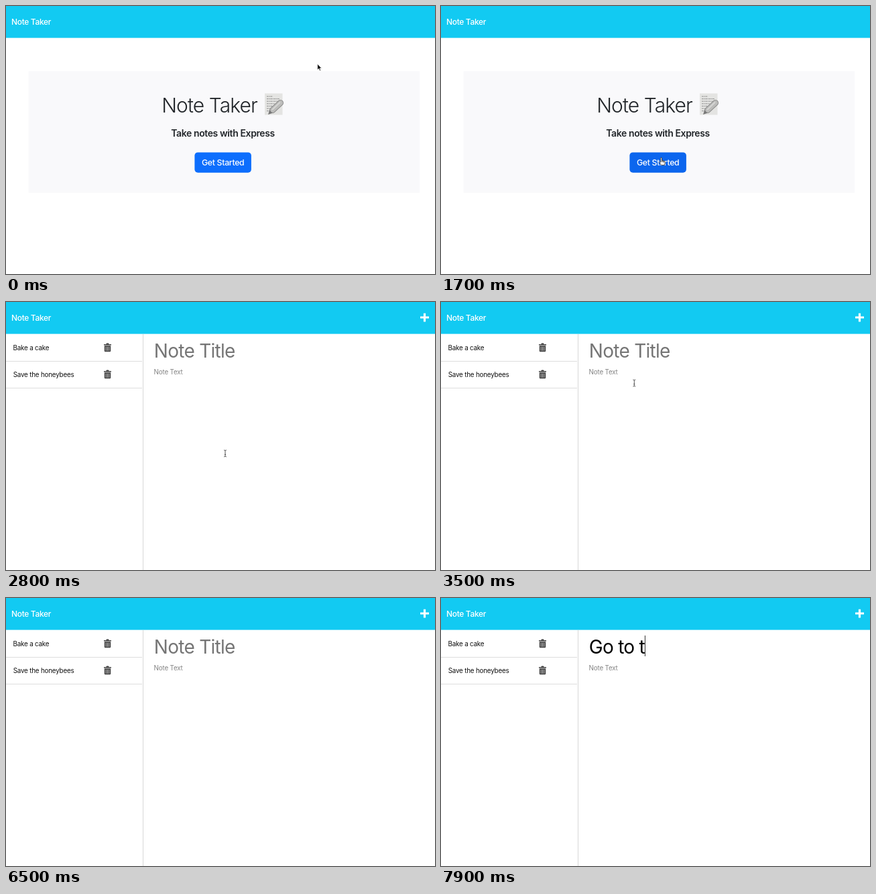
Animation of 640x400 px, one loop 8 s. Source, as an HTML page:

```html
<!DOCTYPE html>
<html lang="en">
<head>
<meta charset="utf-8">
<title>Note Taker</title>
<style>
  html, body { margin: 0; width: 100%; height: 100%; overflow: hidden; background: #fff; }
  svg { display: block; width: 100vw; height: 100vh; }
  text { font-family: Inter, "Liberation Sans", sans-serif; font-optical-sizing: none; white-space: pre; }
  .brand { font-size: 12px; font-weight: 450; letter-spacing: -.34px; fill: #fff; }
  .hero { font-size: 30px; font-weight: 300; letter-spacing: -.9px; fill: #212529; }
  .lead { font-size: 14px; font-weight: 600; letter-spacing: -.4px; fill: #212529; }
  .cta { font-size: 12.3px; font-weight: 450; letter-spacing: -.32px; fill: #fff; }
  .small { font-size: 9.9px; letter-spacing: -.22px; fill: #111; }
  .title { font-size: 28px; letter-spacing: -.72px; }
</style>
</head>
<body>
<svg viewBox="0 0 640 400">
  <defs>
    <g id="trash">
      <path d="M0 1.6h3.2l.8-1.3h3l.8 1.3H11v1.5H0zM.8 4h9.4v7.8q0 1.2-1.2 1.2H2Q.8 13 .8 11.8z" fill="#444"/>
      <path d="M3.2 5.5v6M5.5 5.5v6M7.8 5.5v6" stroke="#ddd" stroke-width=".8"/>
    </g>
  </defs>

  <rect width="640" height="47.6" fill="#12caf2"/>
  <text class="brand" x="8" y="28">Note Taker</text>

  <g id="home">
    <rect x="33.5" y="97.3" width="583.5" height="181.5" fill="#f9f9fb"/>
    <text class="hero" x="232.2" y="159">Note Taker</text>
    <g id="memo" fill="none">
      <rect x="386" y="130.5" width="26.5" height="32" fill="#e4e4e2"/>
      <path d="M389 135h9M389 138.6h19M389 142.2h17M389 145.8h12M389 149.4h9M389 153h6M389 156.6h4"
        stroke="#858585" stroke-width=".9" stroke-dasharray="2.6 .7 1.5 .6"/>
      <path d="M391 162l3-9 6 6z" fill="#777"/>
      <g stroke-linecap="round">
        <path d="M398 155.3L409.500 144.500" stroke="#777" stroke-width="9"/>
        <path d="M398 155.3L409.500 144.500" stroke="#bcbcba" stroke-width="7.4"/>
        <path d="M397.500 154.500l11-10.400" stroke="#d6d6d4" stroke-width="2"/>
      </g>
    </g>
    <rect id="button" x="281.4" y="218.4" width="84.5" height="30.3" rx="4.8"/>
    <text class="lead" x="246.3" y="195">Take notes with Express</text>
    <text class="cta" x="292" y="238.2">Get Started</text>
  </g>

  <g id="notes">
    <path d="M618 23h13M624.5 16.8v12.6" stroke="#fff" stroke-width="3.2"/>
    <path d="M0 88.5h203M0 128.5h203" stroke="#dedede"/>
    <path d="M204.5 48v352" stroke="#d8d8d8"/>
    <text class="small" x="10.5" y="71.7">Bake a cake</text>
    <text class="small" x="10.7" y="111.7">Save the honeybees</text>
    <use href="#trash" x="146" y="61.3"/>
    <use href="#trash" x="146" y="101.3"/>
    <text class="title" id="title" x="220.8" y="83"></text>
    <text class="small" x="220.6" y="107.7" style="fill:#858585">Note Text</text>
    <rect id="caret" y="56" width="1" height="31" fill="#333"/>
  </g>

  <g id="pointer">
    <path id="arrow" d="M0 0v8.8l2-1.8 1.4 3.2 1.4-.6-1.4-3.1h2.7z" fill="#111" stroke="#fff" stroke-width=".6"/>
    <g id="hand" stroke="#222" stroke-width=".8">
      <path d="M1.5.2q1 0 1 1v3.3q2.5 0 4 1.2.9.7.7 2.300l-.8 3.400H1.700L-1.100 7.800q-.5-1.400.6-1.300l1.100.9V1.200q0-1 .9-1z" fill="#fff"/>
      <path d="M2.5 4.500v2.500M4.200 5v2.300M5.700 5.600v2"/>
    </g>
    <path id="beam" d="M-1.900-5Q0-5 0-3.700Q0-5 1.900-5M0-3.700V3.700M-1.900 5Q0 5 0 3.700Q0 5 1.900 5M-1 1.500h2" fill="none" stroke="#444" stroke-width=".9"/>
  </g>
</svg>
<script>
const LOOP = 8000, STEP = 100, PAGE = 2800;
const el = id => document.getElementById(id);
const show = (id, on) => el(id).style.display = on ? "" : "none";

// pointer path: time, x, y
const path = [
  [0, 464.7, 86.5], [600, 464.7, 86.5], [800, 462.7, 87], [900, 462.7, 87],
  [1100, 450, 99], [1400, 350, 199], [1600, 327, 226], [2800, 327, 226],
  [3300, 305.5, 173.5], [3500, 288.3, 121], [3800, 292.5, 92], [4200, 296.2, 80.5]
];
// button shade from each time on
const shades = [[0, "#0d6efd"], [1700, "#0c66ee"], [1800, "#0b5ed7"], [2500, "#0b5cd4"]];
const phrase = "Go to t";
const keys = [6700, 7000, 7200, 7500, 7600, 7700, 7900];

function place(t) {
  const i = path.findIndex(p => p[0] > t);
  if (i < 0) return path[path.length - 1].slice(1);
  const [a, b] = [path[i - 1], path[i]];
  const k = (t - a[0]) / (b[0] - a[0]);
  return [1, 2].map(n => a[n] + (b[n] - a[n]) * k);
}

function draw(now) {
  const t = Math.floor(now % LOOP / STEP) * STEP;
  const notes = t >= PAGE;
  show("home", !notes);
  show("notes", notes);
  el("button").setAttribute("fill", shades.filter(s => s[0] <= t).pop()[1]);

  show("pointer", t < 6300);
  show("arrow", t < 1600);
  show("hand", t >= 1600 && !notes);
  show("beam", notes);
  el("pointer").setAttribute("transform", `translate(${place(t)})`);

  const typed = phrase.slice(0, keys.filter(k => k <= t).length);
  const title = el("title");
  title.textContent = typed || "Note Title";
  title.setAttribute("fill", typed ? "#000" : "#757575");
  el("caret").setAttribute("x", 220.7 + (typed ? title.getComputedTextLength() : 0));
  show("caret", typed || t >= 5000 && t % 1000 < 500);

  requestAnimationFrame(draw);
}
requestAnimationFrame(draw);
</script>
</body>
</html>
```
